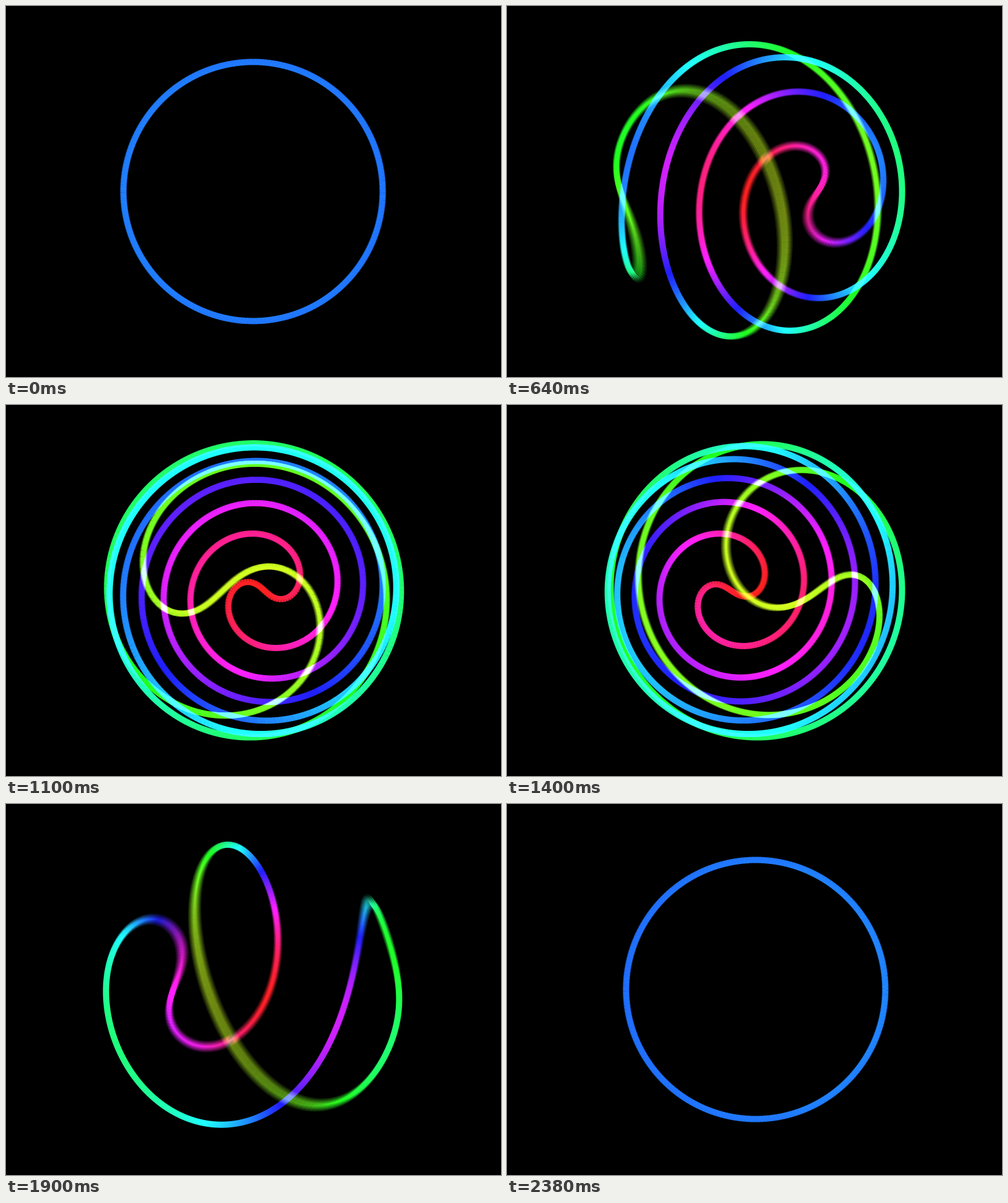
Animation of 800 by 600 pixels, one loop 2400 ms. Source, as an HTML page with a canvas:

```html
<!DOCTYPE html>
<html lang="en">
<head>
<meta charset="utf-8">
<title>Twisting ring</title>
<style>
  html, body { margin: 0; width: 100%; height: 100%; overflow: hidden; background: #000; }
  canvas { display: block; }
</style>
</head>
<body>
<canvas id="stage" width="800" height="600"></canvas>
<script>
const W = 800, H = 600;
const FRAMES = 120, FRAME_MS = 20;
const RADIUS = 209.5, CAMERA = 438;
const TWIST = 11.75;              // radians from equator to pole at full twist
const SAMPLES = 8, SHUTTER = 0.6; // motion blur
const STEP = 6;                   // segment length in px

const ctx = document.getElementById('stage').getContext('2d');
const layer = document.createElement('canvas');
layer.width = W;
layer.height = H;
const pen = layer.getContext('2d');
pen.lineWidth = 10;

const smooth = v => v * v * (3 - 2 * v);

// Point of the great circle, twisted about its axis, turned about y, in perspective
function project(angle, twist, turn) {
  const w = Math.cos(angle), s = Math.sin(angle);
  const u = s * Math.sin(twist * w), y = -s * Math.cos(twist * w);
  const x = w * Math.sin(turn) + u * Math.cos(turn);
  const z = u * Math.sin(turn) - w * Math.cos(turn);
  const scale = RADIUS * CAMERA / (CAMERA - RADIUS * z);
  return { x: W / 2 + x * scale, y: H / 2 + y * scale, z };
}

function drawRing(t) {
  const twist = TWIST * smooth(Math.sin(Math.PI * t) ** 2);
  const turn = Math.PI * (0.5 - t);
  pen.globalCompositeOperation = 'source-over';
  pen.fillStyle = '#000';
  pen.fillRect(0, 0, W, H);
  pen.globalCompositeOperation = 'lighter';

  const end = 2 * Math.PI;
  let angle = 0, from = project(0, twist, turn);
  while (angle < end) {
    const speed = RADIUS * Math.hypot(1, twist * Math.sin(angle) ** 2);
    angle = Math.min(end, angle + STEP / speed);
    const to = project(angle, twist, turn);
    pen.strokeStyle = `hsl(${216 - 72 * (from.z + to.z)}, 100%, 55%)`;
    pen.beginPath();
    pen.moveTo(from.x, from.y);
    pen.lineTo(to.x, to.y);
    pen.stroke();
    from = to;
  }
}

function drawFrame(frame) {
  ctx.globalCompositeOperation = 'source-over';
  ctx.globalAlpha = 1;
  ctx.fillStyle = '#000';
  ctx.fillRect(0, 0, W, H);
  ctx.globalCompositeOperation = 'lighter';
  ctx.globalAlpha = 1 / SAMPLES;
  for (let i = 0; i < SAMPLES; i++) {
    drawRing((frame + SHUTTER * i / SAMPLES) / FRAMES);
    ctx.drawImage(layer, 0, 0);
  }
}

let shown = -1;
function tick() {
  const frame = Math.floor(performance.now() / FRAME_MS) % FRAMES;
  if (frame !== shown) drawFrame(shown = frame);
  requestAnimationFrame(tick);
}
tick();
</script>
</body>
</html>
```
